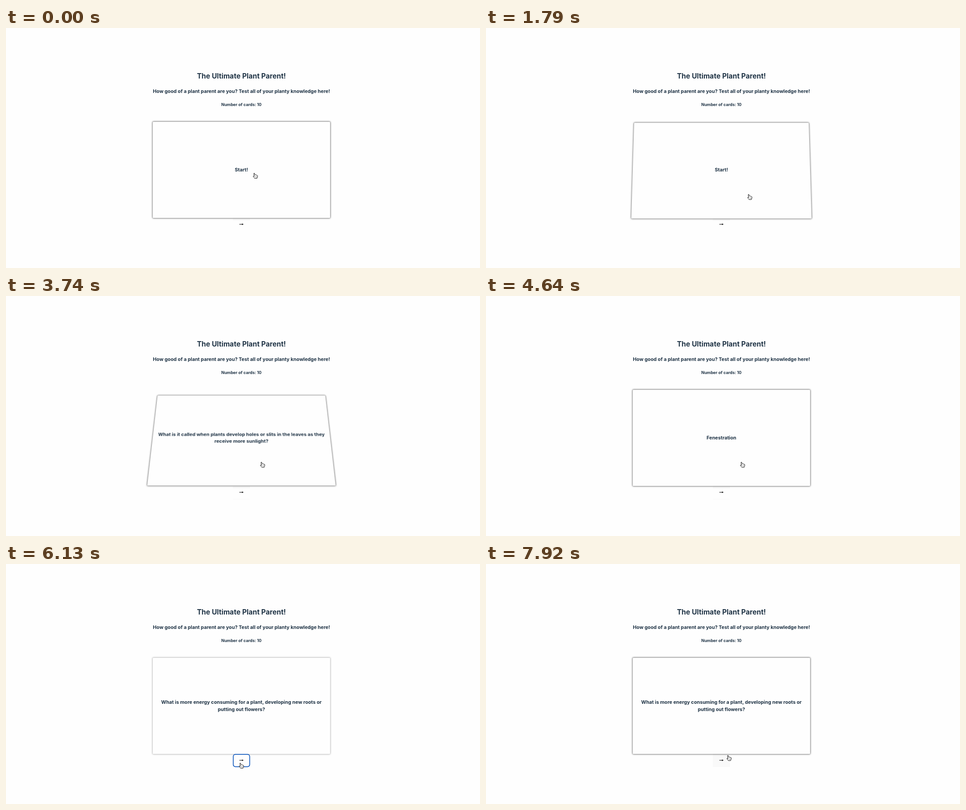
Recreate the animation shown at these times as an HTML page. Size 1053 by 532 pixels, loop 8000 ms.

```html
<!DOCTYPE html>
<html lang="en">
<head>
<meta charset="utf-8">
<title>Flashcards</title>
<style>
  html, body { margin: 0; width: 100%; height: 100%; overflow: hidden; background: #fefefe; }
  #stage {
    position: relative; width: 1053px; height: 532px; overflow: hidden;
    background: #fefefe; color: #213547;
    font: 700 10.74px/16px Inter, "Open Sans", sans-serif;
  }
  .line {
    position: absolute; left: 0; width: 1046px; height: 20px;
    margin: 0; line-height: 20px; text-align: center; white-space: nowrap;
  }
  h1.line { top: 97px; font-size: 15.57px; }
  h2.line { top: 130.5px; font-size: 10.74px; }
  h3.line { top: 159.5px; font-size: 9.1px; }
  #card {
    position: absolute; left: 326px; top: 208px; width: 394px; height: 213px;
    display: flex; align-items: center; justify-content: center;
    text-align: center; white-space: pre;
    background: #fefefe; border-radius: 1.5px;
  }
  svg { position: absolute; left: 0; top: 0; }
</style>
</head>
<body>
<div id="stage">
  <h1 class="line">The Ultimate Plant Parent!</h1>
  <h2 class="line">How good of a plant parent are you? Test all of your planty knowledge here!</h2>
  <h3 class="line">Number of cards: 10</h3>
  <svg width="1053" height="532">
    <rect id="fill" x="504" y="421" width="38" fill="#f9f9f9"/>
    <rect id="base" x="504" y="450" width="37" height="1" fill="#f9f9f9"/>
  </svg>
  <div id="card"></div>
  <svg width="1053" height="532">
    <rect id="ring" x="504.8" y="421.8" width="36.6" height="27.6" rx="5" fill="#fefefe" stroke="#1159bd" stroke-width="1.7"/>
    <path d="M518.4 435.1H525" stroke="#111" stroke-width="1.1"/>
    <path d="M524.4 433.2L527.8 435.1L524.4 437Z" fill="#111"/>
    <g id="hand" stroke="#111" stroke-linejoin="round">
      <path fill="#fff" d="M-3.6-4.8Q-3.3-6.4-1.9-5.4L-.7-1.9Q.4-2.7 1.2-1.6Q2.2-2.2 3-1.1Q4.4-1.4 4.8 0Q5.3 2.6 3.9 4.4L3.6 5.8H-1.6Q-2.4 4.2-4.8 1.9Q-5.2.2-3.2.9L-2.3 1.6Z"/>
      <path fill="none" stroke-width=".4" d="M.2 1.4V3.8M1.6 1.4V3.8M3 1.4V3.8"/>
    </g>
  </svg>
</div>
<script>
const LOOP = 8000, STEP = 150;
const $ = id => document.getElementById(id);
const card = $("card"), hand = $("hand"), ring = $("ring"), fill = $("fill"), base = $("base");

const START = "Start!";
const SLITS = "What is it called when plants develop holes or slits in the leaves as they\nreceive more sunlight?";
const FENESTRATION = "Fenestration";
const ENERGY = "What is more energy consuming for a plant, developing new roots or\nputting out flowers?";
const FLOWERS = "Putting out flowers";

const faces = [
  [0, START], [2840, SLITS], [3440, FENESTRATION], [3740, SLITS], [4640, FENESTRATION],
  [5980, ENERGY], [6870, FLOWERS], [7620, ENERGY]
];
// Angle of the flip about the horizontal axis, in degrees
const tilts = [
  [0, 0], [1790, 5.6], [1940, 0], [3740, 21], [3890, 0], [5980, 20], [6130, 0],
  [6870, -14.4], [7020, 0], [7620, 78], [7770, 0]
];
const buttons = [
  [0, "faint"], [2390, "edged"], [2840, "focus"], [3440, "edged"], [5980, "focus"], [6870, "full"]
];
// Pointer moves: start time, number of steps, end x, end y
const moves = [
  [0, 1, 554, 327.5], [150, 1, 555.5, 325], [740, 4, 586, 374.5], [1940, 4, 523, 444],
  [3140, 4, 570, 374], [5380, 1, 547, 424], [5530, 3, 523, 447], [6570, 3, 560, 388],
  [7770, 2, 540, 430]
];

function valueAt(list, t) {
  let value;
  for (const [start, v] of list) if (t >= start) value = v;
  return value;
}

function pointerAt(t) {
  let x = moves[0][2], y = moves[0][3];
  for (const [start, steps, endX, endY] of moves) {
    if (t < start) break;
    const done = Math.min(1, (Math.floor((t - start) / STEP) + 1) / steps);
    x += (endX - x) * done;
    y += (endY - y) * done;
  }
  return [x, y];
}

function show(el, on) {
  el.style.display = on ? "" : "none";
}

function draw(t) {
  const [x, y] = pointerAt(t);
  const tilt = valueAt(tilts, t), text = valueAt(faces, t), button = valueAt(buttons, t);
  const shade = y < 431 ? 0.62 : 0.32;

  hand.setAttribute("transform", `translate(${x} ${y})`);
  if (card.textContent !== text) card.textContent = text;
  card.style.transform = tilt ? `perspective(656px) rotateX(${tilt}deg)` : "none";
  card.style.boxShadow = `0 0 3.3px .7px rgba(0,0,0,${shade})`;

  show(ring, button === "focus");
  show(base, button === "edged");
  fill.setAttribute("height", button === "full" ? 29 : 5.5);
}

const begin = performance.now();
function tick() {
  draw((performance.now() - begin) % LOOP);
  requestAnimationFrame(tick);
}
tick();
</script>
</body>
</html>
```
